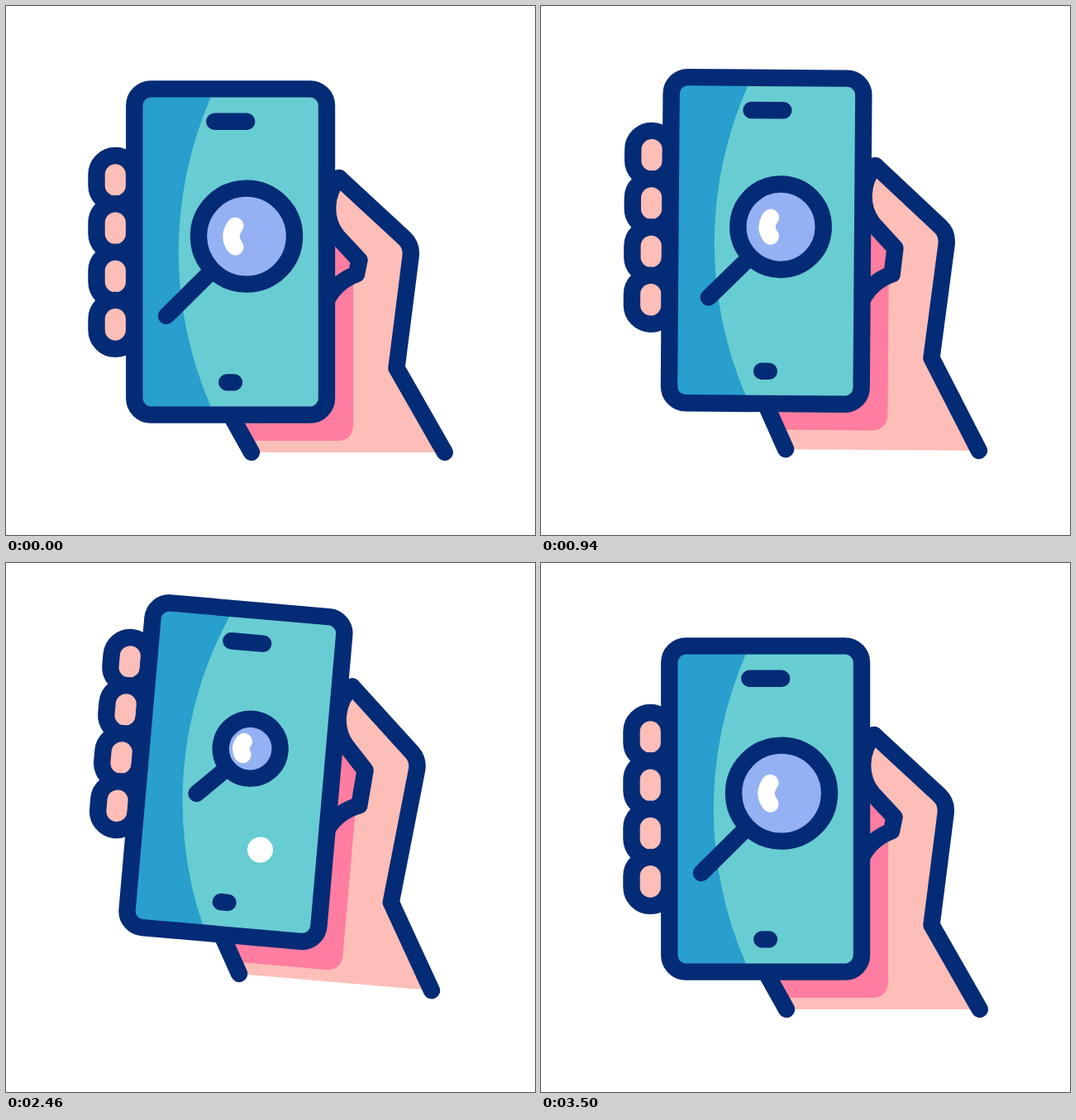
These frames come from a looping animation (640x640 px, 3.6 s). An HTML page:

```html
<!DOCTYPE html>
<html lang="en">
<head>
<meta charset="utf-8">
<title>Phone search</title>
<style>
  html, body { margin: 0; width: 100%; height: 100%; overflow: hidden; background: #fff; }
  svg { display: block; width: 100vw; height: 100vh; }
  .line { fill: none; stroke: #042b76; stroke-width: 20.4; stroke-linecap: round; stroke-linejoin: round; }
</style>
</head>
<body>
<svg viewBox="0 0 640 640">
  <g id="body">
    <path id="skin" fill="#fdbeb8"/>
    <path id="palm" fill="#ff7da0"/>
    <path id="thumb" class="line"/>
    <path id="arm" class="line"/>
    <g id="fingers"></g>
    <rect x="155.3" y="100.4" width="232.7" height="394.2" rx="20" fill="#68cdd2"/>
    <path d="M248 110 A468 468 0 0 0 248 485 V494 H175 Q156 494 156 475 V120 Q156 101 175 101 H248 Z" fill="#289fcc"/>
    <rect class="line" x="155.3" y="100.4" width="232.7" height="394.2" rx="20"/>
    <path class="line" d="M252.3 139.7 H291.2 M267.3 455.4 H276"/>
    <circle id="dot" cx="309.3" cy="388.4" fill="#fff"/>
    <g id="glass" class="line">
      <path d="M-21.5 22.2 L-77.5 77.6"/>
      <circle cx="19.5" cy="-18.8" r="58" style="fill:#94b1f3"/>
      <path d="M5.8 -31.5 Q-3.8 -18.8 5.8 -5.9" stroke="#fff"/>
    </g>
  </g>
</svg>
<script>
const LOOP = 3600;
const CX = 271.5, CY = 297.4;
const $ = id => document.getElementById(id);
const mix = (a, b, k) => a + (b - a) * k;
const ramp = (t, from, to) => Math.min(1, Math.max(0, (t - from) / (to - from)));
const ease = (t, from, to) => {
  const k = ramp(t, from, to);
  return k * k * (3 - 2 * k);
};

// tilt, centre x and y, then slide of fingers, thumb, thumb base and arm ends
const REST = [0, CX, CY, 0, 0, 0, 0];
const LOW  = [-5, 266.2, 320.5, 7.5, 26, 27, 21];
const HIGH = [5, 277.8, 253, -35, -26, 0, 0];
const MOVES = [
  [0, 370, REST, LOW],
  [600, 1245, LOW, HIGH],
  [2600, 3000, HIGH, LOW],
  [3000, 3500, LOW, REST]
];

// corners of the searching loop
const ROUTE = [[0, 0], [12, -7.7], [0, -22], [-11, -7]];
const SMALL = 0.62;

function poseAt(t) {
  const move = MOVES.filter(m => t >= m[0]).pop();
  const k = ease(t, move[0], move[1]);
  return move[2].map((v, i) => mix(v, move[3][i], k));
}

function glassAt(t) {
  const grow = ease(t, 2780, 3270);
  const size = mix(mix(1, SMALL, ease(t, 800, 1200)), 1, grow);
  const step = Math.min(7, Math.max(0, (t - 1200) / 220));
  const i = Math.floor(step);
  const a = ROUTE[i % 4], b = ROUTE[(i + 1) % 4];
  const [x, y] = a.map((v, n) => mix(v, b[n], step - i) * (1 - grow));
  return { x, y, size };
}

function makeFingers() {
  const ns = "http://www.w3.org/2000/svg";
  for (let i = 0; i < 4; i++) {
    const pill = document.createElementNS(ns, "rect");
    const box = { x: 109.5, y: 181 + i * 58.3, width: 45.6, height: 59, rx: 22.8, class: "line" };
    for (const key in box) pill.setAttribute(key, box[key]);
    pill.style.fill = "#fdbeb8";
    $("fingers").append(pill);
  }
}

function draw(t) {
  const [tilt, x, y, slide, up, base, end] = poseAt(t);
  const set = (id, name, value) => $(id).setAttribute(name, value);

  set("body", "transform", `translate(${x} ${y}) rotate(${tilt}) translate(${-CX} ${-CY})`);
  set("fingers", "transform", `translate(0 ${slide})`);

  const outer = `M403 ${208 + up} L482 ${281 + up} Q491.5 ${290 + up} 489.5 ${304 + up}` +
    ` L472.5 438 L530.8 ${540 + end}`;
  set("arm", "d", `${outer} M273 497 L297 ${540 + end}`);
  set("skin", "d", `${outer} L297 ${540 + end} L273 497 L300 400 L386 ${256 + up} Z`);
  set("thumb", "d", `M403 ${208 + up} C386 ${226 + up} 384 ${258 + up} 401 ${279 + up}` +
    ` L427.5 ${307.5 + up} L424 ${324.5 + base} Q400 ${333 + base} 388 ${356 + base}`);
  set("palm", "d", `M385 ${265 + up} L426 ${308 + up} L423 ${325 + base} L420 ${330 + base}` +
    ` V506 Q420 526 400 526 H287 L273 497 L300 400 Z`);

  const g = glassAt(t);
  set("glass", "transform", `translate(${CX + g.x} ${CY + g.y}) scale(${g.size})`);
  $("glass").style.strokeWidth = 20.4 / g.size;

  set("dot", "r", 15.5 * ease(t, 2040, 2200) * (1 - ease(t, 2790, 2950)));
}

makeFingers();
const start = performance.now();
function tick() {
  draw((performance.now() - start) % LOOP);
  requestAnimationFrame(tick);
}
tick();
</script>
</body>
</html>
```
